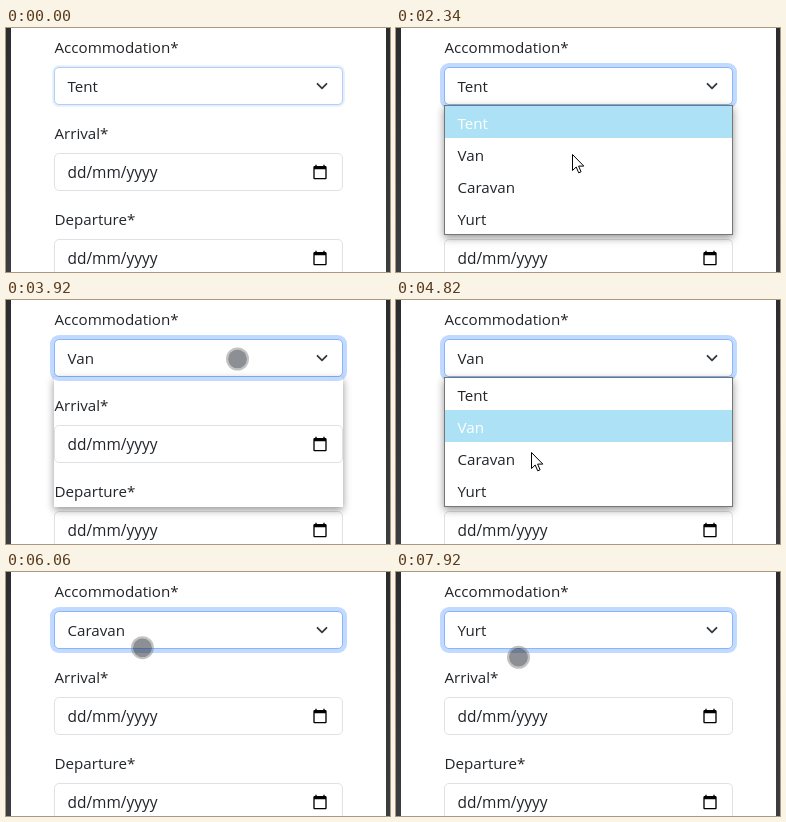
Animation, 384 px wide and 244 px high, one loop 8000 ms. Source, as an HTML page:

```html
<!DOCTYPE html>
<html lang="en">
<head>
<meta charset="utf-8">
<style>
html, body { margin: 0; width: 100%; height: 100%; overflow: hidden; }
body { position: relative; background: linear-gradient(#2b2c2d, #3c3d3f); font: 15.15px "Open Sans", "Noto Sans", sans-serif; color: #212529; }
div, svg { position: absolute; box-sizing: border-box; white-space: nowrap; }
#panel { left: 5px; top: 0; width: 375px; height: 244px; background: #fff; }
.label { left: 48.5px; height: 24px; line-height: 24px; }
.field { left: 48px; width: 289px; height: 38px; line-height: 36px; padding-left: 12.5px; border: 1px solid #dee2e6; border-radius: 5px; background: #fff; }
.date { font-size: 15.45px; }
.date svg { left: 257px; top: 10px; }
#select svg { left: 257px; top: 8px; }
#popup { left: 48px; top: 77px; width: 289px; height: 130px; box-shadow: 0 3px 8px rgba(0,0,0,.42); }
#list { inset: 0; border: 1px solid #767676; background: #fff; }
.option { position: relative; height: 32px; line-height: 34px; padding-left: 12.5px; }
.option.on { background: #ade1f6; color: #fff; }
#touch, #arrow { left: 0; top: 0; }
#touch { width: 23px; height: 23px; margin: -11.5px; border-radius: 50%; border: 2px solid rgba(120,120,120,.45); background: rgba(35,42,50,.52); background-clip: padding-box; }
</style>
</head>
<body>
<div id="panel"></div>
<div class="label" style="top:7px">Accommodation*</div>
<div class="label" style="top:93px">Arrival*</div>
<div class="label" style="top:179px">Departure*</div>
<div class="field date" style="top:125px">dd/mm/yyyy</div>
<div class="field date" style="top:211px">dd/mm/yyyy</div>
<div class="field" id="select" style="top:39px"><span id="value">Tent</span>
  <svg width="20" height="20"><path d="M5.5 7.8l4.5 4.5 4.5-4.5" fill="none" stroke="#343a40" stroke-width="1.8" stroke-linecap="round" stroke-linejoin="round"/></svg>
</div>
<div id="popup"><div id="list"></div></div>
<div id="touch"></div>
<svg id="arrow" width="14" height="22"><path d="M.5.5v16l3.7-3.5 2.5 5.8 2.4-1-2.5-5.7h5.2z" fill="#fff" stroke="#000"/></svg>
<script>
const $ = id => document.getElementById(id);
const LOOP = 8000, REACH = 380, SELECT_Y = 58.5;
const names = ["Tent", "Van", "Caravan", "Yurt"];
const rowY = i => 94 + 32 * i;

const calendar = `<svg width="16" height="16" viewBox="0 0 24 24"><path d="M20 3h-1V1h-2v2H7V1H5v2H4c-1.1 0-2 .9-2 2v16c0 1.1.9 2 2 2h16c1.1 0 2-.9 2-2V5c0-1.1-.9-2-2-2zm0 18H4V8h16z"/></svg>`;
document.querySelectorAll(".date").forEach(f => f.insertAdjacentHTML("beforeend", calendar));
$("list").innerHTML = names.map(n => `<div class="option">${n}</div>`).join("");
const options = [...document.querySelectorAll(".option")];

// Each visit reaches the select, opens the list, moves to the next row and picks it
const visits = [
  { reach: 380, x: 318, open: 1180, move: 1920, stop: 2340, rowX: 176, close: 2700 },
  { reach: 3180, x: 231, open: 3920, move: 3940, stop: 4980, rowX: 135, close: 5160 },
  { reach: 5780, x: 136, open: 6280, move: 6580, stop: 7240, rowX: 122, close: 7440 }
];
const trips = visits.flatMap((v, i) => [
  { from: v.reach, to: v.reach + REACH, x: v.x, y: SELECT_Y },
  { from: v.move, to: v.stop, x: v.rowX, y: rowY(i + 1) }
]);
trips.push({ from: 7650, to: 7650 + REACH, x: 122, y: SELECT_Y });

const clamp = v => Math.max(0, Math.min(1, v));
const ease = v => v * v * (3 - 2 * v);
const easeOut = v => 1 - (1 - v) ** 3;
const mix = (a, b, k) => a + (b - a) * k;

function pointer(t) {
  let x = 344, y = 260;
  for (const p of trips) {
    const k = clamp((t - p.from) / (p.to - p.from));
    x = mix(x, p.x, easeOut(k));
    y = mix(y, p.y, ease(k));
  }
  return [x, y];
}

function place(el, x, y, show) {
  el.style.transform = `translate(${x}px,${y}px)`;
  el.style.display = show ? "block" : "none";
}

function draw(t) {
  const focus = t < 1000 ? .45 * (1 - ease(clamp(t / 70))) : ease(clamp((t - 1180) / 150));
  $("select").style.borderColor = `rgb(${mix(222, 134, focus)},${mix(226, 183, focus)},${mix(230, 254, focus)})`;
  $("select").style.boxShadow = `0 0 0 ${4 * focus}px rgba(13,110,253,${.25 * focus})`;

  const done = visits.filter(v => t >= v.close).length;
  $("value").textContent = names[done];

  const visit = visits.find(v => t >= v.open && t < v.close);
  $("popup").style.display = visit ? "block" : "none";
  if (visit) {
    // The shadow shows one step before the list
    $("list").style.display = t >= visit.open + 20 ? "block" : "none";
    const hover = t < visit.close - 190 ? done : done + 1;
    options.forEach((o, i) => o.classList.toggle("on", i === hover));
  }

  const [x, y] = pointer(t);
  const inList = visit && y > 77;
  place($("touch"), x, y, !inList);
  place($("arrow"), Math.round(x), Math.round(y), inList);
}

const start = performance.now();
function tick() {
  draw((performance.now() - start) % LOOP);
  requestAnimationFrame(tick);
}
draw(0);
requestAnimationFrame(tick);
</script>
</body>
</html>
```
